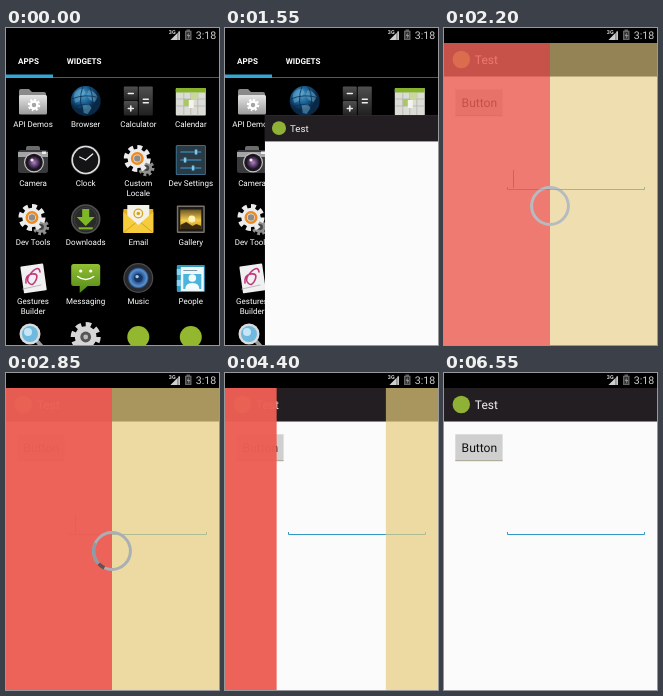
An HTML page that plays this animation: 213x317 px, repeating every 6700 ms.

```html
<!DOCTYPE html>
<html lang="en">
<head>
<meta charset="utf-8">
<title>Launch and load</title>
<style>
  html, body { margin: 0; width: 100%; height: 100%; overflow: hidden; background: #000; }
  svg { display: block; width: 213px; height: 317px; font-family: Roboto, "Noto Sans", sans-serif; text-rendering: geometricPrecision; }
  .label { font-size: 8px; fill: #fff; text-anchor: middle; }
  .tab { font-size: 8.1px; font-weight: 700; fill: #fff; }
</style>
</head>
<body>
<svg id="stage" viewBox="0 0 213 317">
  <defs>
    <clipPath id="below"><rect y="15" width="213" height="302"/></clipPath>
    <linearGradient id="steel" x2="0" y2="1"><stop stop-color="#e6e6e6"/><stop offset="1" stop-color="#9b9b9b"/></linearGradient>
    <linearGradient id="coal" x2="0" y2="1"><stop stop-color="#505050"/><stop offset="1" stop-color="#202020"/></linearGradient>
    <linearGradient id="leaf" x2="0" y2="1"><stop stop-color="#92bf34"/><stop offset="1" stop-color="#528a16"/></linearGradient>
    <linearGradient id="dusk" x2="0" y2="1"><stop stop-color="#6a5626"/><stop offset=".55" stop-color="#f6cc4a"/><stop offset="1" stop-color="#c6921f"/></linearGradient>
    <radialGradient id="sea" cx=".4" cy=".3"><stop stop-color="#4f9fcb"/><stop offset=".6" stop-color="#185a8c"/><stop offset="1" stop-color="#0a2744"/></radialGradient>
    <radialGradient id="lens"><stop stop-color="#b184bf"/><stop offset=".5" stop-color="#60406f"/><stop offset="1" stop-color="#0f0b14"/></radialGradient>
    <radialGradient id="cone"><stop stop-color="#14305e"/><stop offset=".4" stop-color="#24528f"/><stop offset=".8" stop-color="#5b92cf"/><stop offset="1" stop-color="#1b3c6c"/></radialGradient>
  </defs>

  <rect width="213" height="317"/>
  <g clip-path="url(#below)">
    <g id="home">
      <text class="tab" x="12" y="36">APPS</text>
      <text class="tab" x="60.7" y="36">WIDGETS</text>
      <rect y="49" width="213" height="1" fill="#1d6c8c"/>
      <rect y="46.5" width="47" height="3.5" fill="#33a6d8"/>
      <g id="apps"></g>
    </g>

    <g id="win">
      <rect y="15" width="213" height="345" fill="#fbfbfb"/>
      <rect y="15" width="213" height="33" fill="#221e21"/>
      <rect y="48" width="213" height="1" fill="#8b8687"/>
      <circle cx="17.3" cy="31.5" r="8.7" fill="#8fb135"/>
      <text x="30.8" y="36" font-size="12" fill="#f3f3f3">Test</text>
      <g id="form">
        <rect x="11.3" y="61.3" width="47.3" height="26.5" fill="#cfcfcf"/>
        <rect x="11.3" y="87.2" width="47.3" height="1" fill="#aaa48c"/>
        <text x="17.6" y="79.3" font-size="12.1" fill="#111">Button</text>
        <path d="M63.5 159V161.5H200.5V159" fill="none" stroke="#3399c4"/>
        <rect id="caret" x="69" y="142" width="1" height="18" fill="#666"/>
      </g>
    </g>

    <g id="cover">
      <rect id="left" y="15" width="106" height="302" fill="#ed5e54" fill-opacity=".97"/>
      <rect id="right" y="15" width="107" height="302" fill="#e7cd7b" fill-opacity=".69"/>
      <g id="wheel" fill="none" stroke-width="3">
        <circle cx="106" cy="178" r="18.4" stroke="#a9b0b4"/>
        <g id="spin">
          <path id="tail" stroke="#8b9ca8"/>
          <path id="bar" stroke="#62534e" stroke-width="3.6"/>
        </g>
      </g>
    </g>
  </g>

  <g id="status">
    <path d="M174 2.5V12H164.5Z" fill="#5e5e5e"/>
    <path d="M171.5 5V12H164.5Z" fill="#cfcfcf"/>
    <path d="M172.3 3.5H174V12h-1.7Z" fill="#c4c4c4"/>
    <text x="162.8" y="6.2" font-size="5.4" font-weight="700" fill="#d4d4d4">3G</text>
    <path d="M180.5 1.5h3.5v1.2h1.5V12h-6.5V2.7h1.5Z" fill="#666"/>
    <path d="M180.3 4h3.9v6.8h-3.9Z" fill="#333"/>
    <path d="M182.8 4.5l-2 3.5h1.6l-.5 3 2.3-4h-1.6Z" fill="#999"/>
    <text x="189.8" y="11.2" font-size="10.6" fill="#cdcdcd">3:18</text>
  </g>
</svg>

<script>
const LOOP = 6700;
const $ = id => document.getElementById(id);

// Icon parts, drawn around a centre of 0,0
const box = (x, y, w, h, fill, r = 0) =>
  `<rect x="${x}" y="${y}" width="${w}" height="${h}" rx="${r}" fill="${fill}"/>`;
const disc = (r, fill, x = 0, y = 0) => `<circle cx="${x}" cy="${y}" r="${r}" fill="${fill}"/>`;
const ring = (r, w, stroke, x = 0, y = 0) =>
  `<circle cx="${x}" cy="${y}" r="${r}" fill="none" stroke="${stroke}" stroke-width="${w}"/>`;
const line = (d, stroke, w = 1.5) =>
  `<path d="${d}" fill="none" stroke="${stroke}" stroke-width="${w}" stroke-linecap="round" stroke-linejoin="round"/>`;
const shape = (d, fill, opacity = 1) => `<path d="${d}" fill="${fill}" opacity="${opacity}"/>`;
const gear = (r, fill, hub, x = 0, y = 0) =>
  `<circle cx="${x}" cy="${y}" r="${r}" fill="none" stroke="${fill}" stroke-width="${r * .5}" pathLength="16" stroke-dasharray="1.1 .9"/>` +
  disc(r * .9, fill, x, y) + disc(r * .45, hub, x, y);

const icons = {
  folder: () => shape('M-14-10q0-2 2-2h8l3 3h12q2 0 2 2V13H-14Z', '#8a8a8a') +
    box(-14, -6, 28, 19.5, 'url(#steel)', 1.5) + gear(5, '#fff', '#a5a5a5', 1, 4),
  globe: () => disc(15, 'url(#sea)') +
    shape('M-11-8q5-5 9-4l2 4-5 3-1 5-4 2q-3-5-1-10ZM3-11q6 1 9 7l-3 5-5-2-3-5ZM-3 4l6-1 3 4-4 6-4-1Z', '#6fb3d6', .5) +
    line('M-14-2Q0-8 14-3M-13 6Q0 1 13 6M-3-14Q-8 0-2 14M4-14Q10 0 4 14', '#0a2f52', .8),
  calc: () => box(-14.5, -14.5, 14, 14, 'url(#coal)', 1) + box(-14.5, 0, 14, 14.5, 'url(#coal)', 1) +
    box(.5, -14.5, 14, 29, 'url(#coal)', 1) +
    line('M-10-7.5h5M-10 7.5h5M-7.5 5v5M5-1.8h5M5 1.8h5', '#eee', 1.5),
  calendar: () => box(-15, -13, 30, 27.5, '#dcdcd6', 1) + box(-15, -13, 30, 4.5, '#86b32a', 1) +
    line('M-14-2h28M-14 5h28M-7-8v22M0-8v22M7-8v22', '#b4b4ac', .8) +
    box(-7, -2, 7, 7, '#a9c765') + box(0, -8, 7, 6, '#c8d79a') + box(-2, -1, 5, 8, '#f4f4ea'),
  camera: () => box(-7, -14, 14, 8, '#6c6c6c', 2) + box(-15, -10, 30, 23, '#3a3a3c', 2.5) +
    box(-15, -8, 30, 5, '#a4a4a6') + disc(10, '#c4c4c6', 1, 2.5) + disc(8.8, '#1c1a1e', 1, 2.5) +
    disc(7.2, 'url(#lens)', 1, 2.5) + disc(1.6, '#f4e8f8', -1, 0) + box(9, -8.5, 4, 2.5, '#eee'),
  clock: () => disc(14.8, '#3a3a3c') + ring(13.4, 1.7, '#dedede') + disc(12.4, '#141416') +
    line('M0 0L7-6M0 0L-6-3', '#f2f2f2', 1.3),
  gears: () => gear(6.5, '#8f8f8f', '#444', 8, 8) + gear(10.8, '#ececec', '#ececec', -1, -1.5) +
    ring(5.2, 2.6, '#f08a1c', -1, -1.5) + disc(3.2, '#8c8c8c', -1, -1.5),
  sliders: () => box(-15, -15, 30, 30, '#3d7fa3', 1.5) + box(-14.2, -14.2, 28.4, 28.4, '#2b3b46', 1) +
    line('M-10-8h20M-10 0h20M-10 8h20', '#3aa3d8', 1.2) +
    box(4, -10.5, 2.5, 5, '#7cc8ee') + box(-7, -2.5, 2.5, 5, '#7cc8ee') + box(1, 5.5, 2.5, 5, '#7cc8ee'),
  down: () => disc(14.8, '#505050') + disc(13.2, '#2a2a2a') + ring(11.5, 1, '#3e3e3e') +
    shape('M-3.5-10h7v8H9L0 7-9-2h5.5Z', '#7fb827') + box(-7, 8.3, 14, 2, '#7fb827'),
  mail: () => box(-15, -10, 30, 24, '#e3b02b', 1) + box(-11, -14, 22, 20, '#f4f2e8') +
    ring(4.3, 1.3, '#d6a419', 0, -5.5) + disc(1.8, '#d6a419', 0, -5.5) +
    shape('M-15-7L0 6 15-7V13q0 1-1 1h-28q-1 0-1-1Z', '#f6cb3c') + line('M-14 13L-3 4M14 13L3 4', '#d29f18', .9),
  picture: () => box(-14, -13.5, 28, 27.5, '#77736a', 1) + box(-12.5, -12, 25, 24.5, '#1d1b17') +
    box(-10.5, -9.5, 21, 19.5, 'url(#dusk)') + disc(3.5, '#fff3b8', 1, 0) + shape('M-10.5 10V6l6-3 6 4 4-2 5 2v3Z', '#3b2c10'),
  gesture: () => `<g transform="rotate(-8)">${box(-11, -13, 23, 27, '#f0f0f0', 1)}</g>` +
    line('M-7 5q-1-8 6-9t4 6-7 3 3-11 8 0', '#c2387c', 1.6) + line('M-10 11L8 7', '#bbb', 1),
  chat: () => shape('M-12-14h24q2.5 0 2.5 2.5V5.5Q14.5 8 12 8H2l-8 7V8h-6q-2.500 0-2.500-2.500v-17q0-2.500 2.500-2.500Z', 'url(#leaf)') +
    disc(1.6, '#fff', -5, -7) + disc(1.6, '#fff', 5, -7) + line('M-8-1.500Q0 4.500 8-1.500', '#fff', 1.5),
  music: () => disc(15, '#4b4b4e') + disc(13.8, '#29292c') + disc(10.5, 'url(#cone)') +
    disc(4.2, '#173663') + disc(1.7, '#a9cdf0', -1.2, -1.4),
  people: () => box(-14, -13, 28, 27, '#2f9cc4', 1) + box(-10, -11, 23, 24, '#eef6f9') +
    box(-7.5, -4, 18, 15, '#4bb4da') + disc(3.8, '#f4fbfd', 1.5, 0) + shape('M-5.500 11q0-6 7-6t7 6Z', '#f4fbfd') +
    line('M-7-7.500h13', '#7f9aa4', 1) + box(-14, -9, 4, 6, '#8ad3ee') + box(-14, 2, 4, 6, '#8ad3ee'),
  search: () => line('M4 4L11 12', '#9a9a9a', 4) + disc(10.5, '#dcdcdc', -3, -3) + disc(8, '#6fb8de', -3, -3) + disc(4, '#c4e6f7', -5, -5),
  cog: () => gear(12, '#d6d6d6', '#555') + disc(2.4, '#bbb'),
  dot: () => disc(11, '#93b82f')
};

const cols = [27, 79.7, 132.3, 184.8];
const apps = [
  ['folder', 'API Demos'], ['globe', 'Browser'], ['calc', 'Calculator'], ['calendar', 'Calendar'],
  ['camera', 'Camera'], ['clock', 'Clock'], ['gears', 'Custom|Locale'], ['sliders', 'Dev Settings'],
  ['gears', 'Dev Tools'], ['down', 'Downloads'], ['mail', 'Email'], ['picture', 'Gallery'],
  ['gesture', 'Gestures|Builder'], ['chat', 'Messaging'], ['music', 'Music'], ['people', 'People'],
  ['search', ''], ['cog', ''], ['dot', ''], ['dot', '']
];

$('apps').innerHTML = apps.map(([icon, name], i) => {
  const x = cols[i % 4], y = 73 + 59 * Math.floor(i / 4);
  const words = name.split('|').map((w, n) =>
    `<text class="label" x="${x}" y="${y + 26.2 + 9.3 * n}">${w}</text>`).join('');
  return `<g transform="translate(${x} ${y})">${icons[icon]()}</g>${words}`;
}).join('') + `<circle id="press" cx="184.8" cy="309" r="11.3" fill="#6fb6c8" fill-opacity=".35" stroke="#4fc0ea" stroke-width="1.8"/>`;

const arc = (from, to, r = 18.4) => {
  const at = deg => {
    const a = deg * Math.PI / 180;
    return `${106 + r * Math.cos(a)} ${178 + r * Math.sin(a)}`;
  };
  return `M${at(from)}A${r} ${r} 0 0 1 ${at(to)}`;
};
$('bar').setAttribute('d', arc(-11, 11));
$('tail').setAttribute('d', arc(11, 80));

const part = (t, start, length) => Math.min(1, Math.max(0, (t - start) / length));
const slow = (p, power = 2) => 1 - (1 - p) ** power;
const show = (id, on) => $(id).setAttribute('display', on ? 'inline' : 'none');
const fade = (id, v) => $(id).setAttribute('opacity', v);

function draw(t) {
  show('press', t >= 1000 && t < 1700);

  // Window grows out of the tapped icon
  const grow = slow(part(t, 1477, 200), 3);
  const sx = .25 + .75 * grow, sy = .15 + .85 * grow;
  $('win').setAttribute('transform', `translate(${213 * (1 - sx)} ${354 * (1 - sy)}) scale(${sx} ${sy})`);
  show('win', t >= 1500);
  show('form', t >= 1700);
  show('caret', t < 2050 || Math.floor((t - 4465) / 415) % 2 === 0);

  // Halves fade in together, then slide apart
  fade('cover', slow(part(t, 2020, 300)));
  const open = slow(part(t, 4250, 500));
  $('left').setAttribute('x', -106 * open);
  $('right').setAttribute('x', 106 + 107 * open);

  fade('wheel', 1 - part(t, 4100, 150));
  fade('spin', part(t, 2250, 150));
  $('spin').setAttribute('transform', `rotate(${202 + (t - 3700) * 360 / 700} 106 178)`);
}

const begin = performance.now();
function tick() {
  draw((performance.now() - begin) % LOOP);
  requestAnimationFrame(tick);
}
draw(0);
requestAnimationFrame(tick);
</script>
</body>
</html>
```
